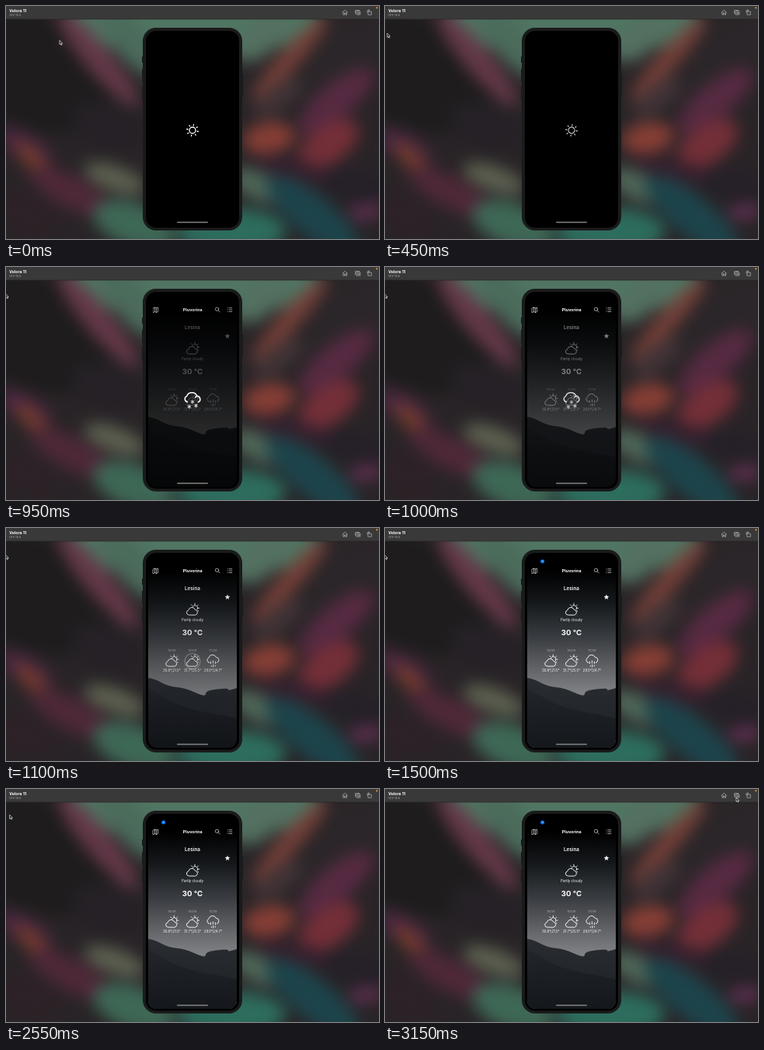
An HTML page for the animation above (3200 ms loop, 480 px wide and 300 px high).

```html
<!DOCTYPE html>
<html lang="en">
<head>
<meta charset="utf-8">
<title>Weather app launch</title>
<style>
  html, body { margin: 0; width: 100%; height: 100%; overflow: hidden; background: #292427; }
  svg { display: block; width: 100vw; height: 100vh; }
  text { font-family: Inter, "Liberation Sans", sans-serif; fill: #fff; }
  .mid { text-anchor: middle; }
  .bold { font-weight: 700; }
  .line { fill: none; stroke: #fff; stroke-linecap: round; stroke-linejoin: round; }
</style>
</head>
<body>
<svg viewBox="0 0 480 300">
  <defs>
    <filter id="blur" filterUnits="userSpaceOnUse" x="-60" y="-60" width="600" height="420" color-interpolation-filters="sRGB">
      <feGaussianBlur stdDeviation="10"/>
    </filter>
    <linearGradient id="sky" gradientUnits="userSpaceOnUse" x1="0" y1="33" x2="0" y2="212">
      <stop offset=".12" stop-color="#000"/><stop offset=".35" stop-color="#15181b"/>
      <stop offset=".6" stop-color="#393c40"/><stop offset="1" stop-color="#808184"/>
    </linearGradient>
    <linearGradient id="hill" gradientUnits="userSpaceOnUse" x1="0" y1="192" x2="0" y2="245">
      <stop stop-color="#292c31"/><stop offset="1" stop-color="#22262b"/>
    </linearGradient>
    <linearGradient id="near" gradientUnits="userSpaceOnUse" x1="0" y1="207" x2="0" y2="283">
      <stop stop-color="#22262b"/><stop offset=".55" stop-color="#1a1d22"/><stop offset="1" stop-color="#14171b"/>
    </linearGradient>
    <clipPath id="screen"><rect x="183" y="33" width="114" height="250" rx="11"/></clipPath>
    <g id="partly" class="line" stroke-width=".9">
      <path d="M-4.8 7A3.1 3.1 0 0 1-5.2.9A4.5 4.5 0 0 1 3.4.2A3.5 3.5 0 0 1 4 7Z"/>
      <path d="M0-3.5A3.5 3.5 0 0 1 6.3-.4M3-7.9v1.4M7.3-6l-1 1M8.6-1.8H7.4M-1.4-6.2l.9 1M7.7 2l-.9-.6"/>
    </g>
    <g id="rain" class="line" stroke-width=".9">
      <path d="M-4.5 2.5A3.3 3.3 0 0 1-5.5-3.8A4.9 4.9 0 0 1 3.8-4.7A3.7 3.7 0 0 1 5 2.5"/>
      <path d="M-3 1v2.5M0 0v3M3 1v2.5M-2 6.3v.8M.4 5.2v2.6M3 6v.8"/>
    </g>
    <path id="flake" class="line" stroke-width=".8" d="M0-2.3V2.3M-2-1.15L2 1.15M-2 1.15L2-1.15"/>
  </defs>

  <rect width="480" height="300" fill="#292427"/>
  <g id="wallpaper" filter="url(#blur)"></g>

  <rect width="480" height="17" fill="#3a393a"/>
  <path d="M0 17h480" stroke="#242324" stroke-width=".6"/>
  <text class="bold" x="4.3" y="8.2" font-size="5.2">Velora 11</text>
  <text x="4.3" y="13.2" font-size="3.9" style="fill:#aaa">Orv 15.5</text>
  <g class="line" stroke-width=".7" style="stroke:#b8b8b8">
    <path d="M433 8.3L436.2 5.3L439.4 8.3M434 7.8V11.2h1.5V9h1.5v2.2h1.5V7.8"/>
    <path d="M449.6 9.5V5.6h5M451.3 7h1l.6-.8h1.4l.6.8h1v4h-4.6Z"/><circle cx="453.6" cy="8.9" r="1"/>
    <path d="M466.3 7.2h4v4h-4ZM465 8V5.8h2.6M466.7 4.7l1.1 1.1l-1.1 1.1"/>
  </g>
  <circle cx="477.3" cy="2.3" r="1.1" fill="#f59a23"/>

  <g fill="#1a1b1b">
    <path d="M175 65h2v8h-2zM175 81h2v17h-2zM175 103h2v17h-2zM303 87h2v28h-2z"/>
    <rect x="176" y="28" width="128" height="261" rx="17"/>
  </g>
  <rect x="180" y="32" width="120" height="253.5" rx="13"/>

  <g id="home" clip-path="url(#screen)">
    <path d="M183 33h114v250H183z" fill="url(#sky)"/>
    <path d="M183 193Q191 194 200 199T220 205T244 212T257 213.5T272 207.5T286 208T297 206V283H183Z" fill="url(#hill)"/>
    <path d="M183 207Q194 212 205 219T232 231T262 238T297 245V283H183Z" fill="url(#near)"/>
    <text class="mid" x="240" y="79.9" font-size="6.3" font-weight="600">Lesina</text>
    <path id="star" fill="#fff"/>
    <use href="#partly" x="240" y="105"/>
    <text class="mid" x="240" y="119.7" font-size="4.5">Partly cloudy</text>
    <text class="mid bold" x="240" y="138" font-size="9.6">30 °C</text>
    <g id="days"></g>
  </g>

  <g id="header">
    <text class="mid bold" x="240.3" y="57.1" font-size="5.4">Pluvorina</text>
    <g class="line" stroke-width=".7" style="stroke:#ddd">
      <path d="M189.4 53l2.1-1l2 1l2.1-1v5.6l-2.1 1l-2-1l-2.1 1ZM191.5 52v5.6M193.5 53v5.6"/>
      <circle cx="271.5" cy="54.3" r="2.2"/><path d="M273.2 56l2 2"/>
      <path d="M287 52.7h3.8M287 55.1h3.8M287 57.5h3.8M285 52.7h.1M285 55.1h.1M285 57.5h.1"/>
    </g>
  </g>

  <g id="locator">
    <circle cx="202.6" cy="42.9" r="2.5" fill="#0a74ff"/>
    <path d="M201.5 43l2.1-1.1l-1 2.2v-1.1Z" fill="#fff"/>
  </g>

  <g id="splash">
    <g id="sun" class="line" stroke-width="1.3">
      <circle r="4"/><path id="rays"/>
    </g>
    <g id="snow">
      <path class="line" stroke-width="1.5" d="M233.5 173.8A3.9 3.9 0 0 1 232.5 166.4A7.2 7.2 0 0 1 246 166.3A4 4 0 0 1 247.4 174"/>
      <path class="line" stroke-width="1.5" d="M243.5 168.2A4 4 0 0 1 246 166.3"/>
      <g id="flakes"><use href="#flake" x="240" y="174"/><use href="#flake" x="235.8" y="180.2"/><use href="#flake" x="244.5" y="179"/></g>
    </g>
    <circle id="ring" class="line" cx="240" cy="171.5" r="10" stroke-width="1.1"/>
  </g>
  <rect x="220" y="277.7" width="40" height="1.5" rx=".75" fill="#858585"/>

  <path id="cursor" d="M0 0V5.2L1.2 4.2L2.1 6L3 5.6L2.2 3.9H3.7Z" fill="#111" stroke="#fff" stroke-width=".65" stroke-linejoin="round"/>
</svg>
<script>
const LOOP = 3200;
const $ = id => document.getElementById(id);
const ramp = (t, from, to) => Math.min(1, Math.max(0, (t - from) / (to - from)));
const ease = p => p * p * (3 - 2 * p);
const mix = (a, b, p) => a + (b - a) * p;
const polar = (r, a) => `${(r * Math.cos(a)).toFixed(2)} ${(r * Math.sin(a)).toFixed(2)}`;

// Blurred patches: colour, centre, radii, tilt
$('wallpaper').innerHTML = [
  ['#507562', 240, 20, 165, 45, 0], ['#4b6b5b', 160, 45, 60, 22, 50],
  ['#1e1c1d', 35, 85, 110, 70, 25], ['#643848', 118, 68, 78, 17, 50],
  ['#252126', 130, 155, 50, 30, 20], ['#4c2742', 25, 182, 38, 16, 30],
  ['#753c2c', 38, 202, 36, 11, 48], ['#4f2838', 85, 240, 62, 20, 28],
  ['#2c2227', 25, 268, 48, 28, 20], ['#5c6050', 140, 222, 42, 16, 20],
  ['#3e6856', 165, 282, 55, 28, 20], ['#2d6d5e', 290, 290, 70, 30, 0],
  ['#537060', 330, 38, 44, 22, -45], ['#2b2629', 440, 70, 80, 45, -40],
  ['#743f38', 365, 68, 72, 13, -48], ['#403336', 350, 118, 38, 16, -40],
  ['#572a42', 425, 122, 60, 22, -40], ['#863e35', 338, 170, 34, 20, -10],
  ['#742f38', 415, 178, 45, 24, -35], ['#34212d', 375, 212, 60, 14, 15],
  ['#4e6657', 325, 232, 40, 18, 25], ['#1d444b', 395, 270, 75, 26, 40],
  ['#252029', 450, 232, 42, 18, 10], ['#633053', 463, 265, 22, 9, -8]
].map(([fill, x, y, rx, ry, tilt]) =>
  `<ellipse rx="${rx}" ry="${ry}" fill="${fill}" transform="translate(${x} ${y}) rotate(${tilt})"/>`).join('');

$('days').innerHTML = [
  [213.3, '15/09', 'partly', '30.8°|21.5°'],
  [240, '16/09', 'partly', '31.7°|25.5°'],
  [266.4, '17/09', 'rain', '29.0°|24.7°']
].map(([x, date, icon, temps]) => `
  <text class="mid" x="${x}" y="158.6" font-size="4" style="fill:#aaa">${date}</text>
  <use href="#${icon}" x="${x}" y="171"/>
  <text class="mid" x="${x}" y="185" font-size="4.3">${temps}</text>`).join('');

const starPoints = Array.from({ length: 10 }, (_, i) => polar(i % 2 ? 1.5 : 3.6, (i / 5 - .5) * Math.PI));
$('star').setAttribute('d', `M${starPoints.join('L')}Z`);
$('star').setAttribute('transform', 'translate(285 89)');

$('rays').setAttribute('d', Array.from({ length: 8 }, (_, i) => {
  const angle = i * Math.PI / 4 + .2;
  return `M${polar(6.2, angle)}L${polar(7.5, angle)}`;
}).join(''));

function cursorAt(t) {
  if (t < 2500) {
    const p = ease(ramp(t, 0, 520));
    return [mix(69, -.5, p), mix(44.3, 34.6, p)];
  }
  if (t < 3050) {
    const p = ease(ramp(t, 2513, 3090)) / ease(ramp(3050, 2513, 3090));
    return [mix(-.5, 409.3, p), mix(33.5, 8.5, p)];
  }
  const p = 1 - (1 - ramp(t, 3050, 3150)) ** 2;
  return [mix(409.3, 452, p), mix(8.5, 11, p)];
}

function draw(t) {
  const show = (id, opacity) => $(id).setAttribute('opacity', opacity);
  show('home', ramp(t, 870, 1130));
  show('header', ramp(t, 850, 960));
  show('locator', ramp(t, 1200, 1250));
  show('splash', 1 - ramp(t, 960, 1160));

  show('sun', 1 - ramp(t, 420, 550));
  $('sun').setAttribute('transform', `translate(240 160) rotate(${t * .09})`);
  show('snow', ramp(t, 500, 620) * (1 - ramp(t, 1000, 1080)));
  $('flakes').setAttribute('transform', `translate(0 ${Math.sin((t - 750) / 125 * Math.PI) * .4})`);
  show('ring', ramp(t, 1020, 1090));

  $('cursor').setAttribute('transform', `translate(${cursorAt(t).join(' ')})`);
}

const start = performance.now();
function tick() {
  draw((performance.now() - start) % LOOP);
  requestAnimationFrame(tick);
}
draw(0);
requestAnimationFrame(tick);
</script>
</body>
</html>
```
